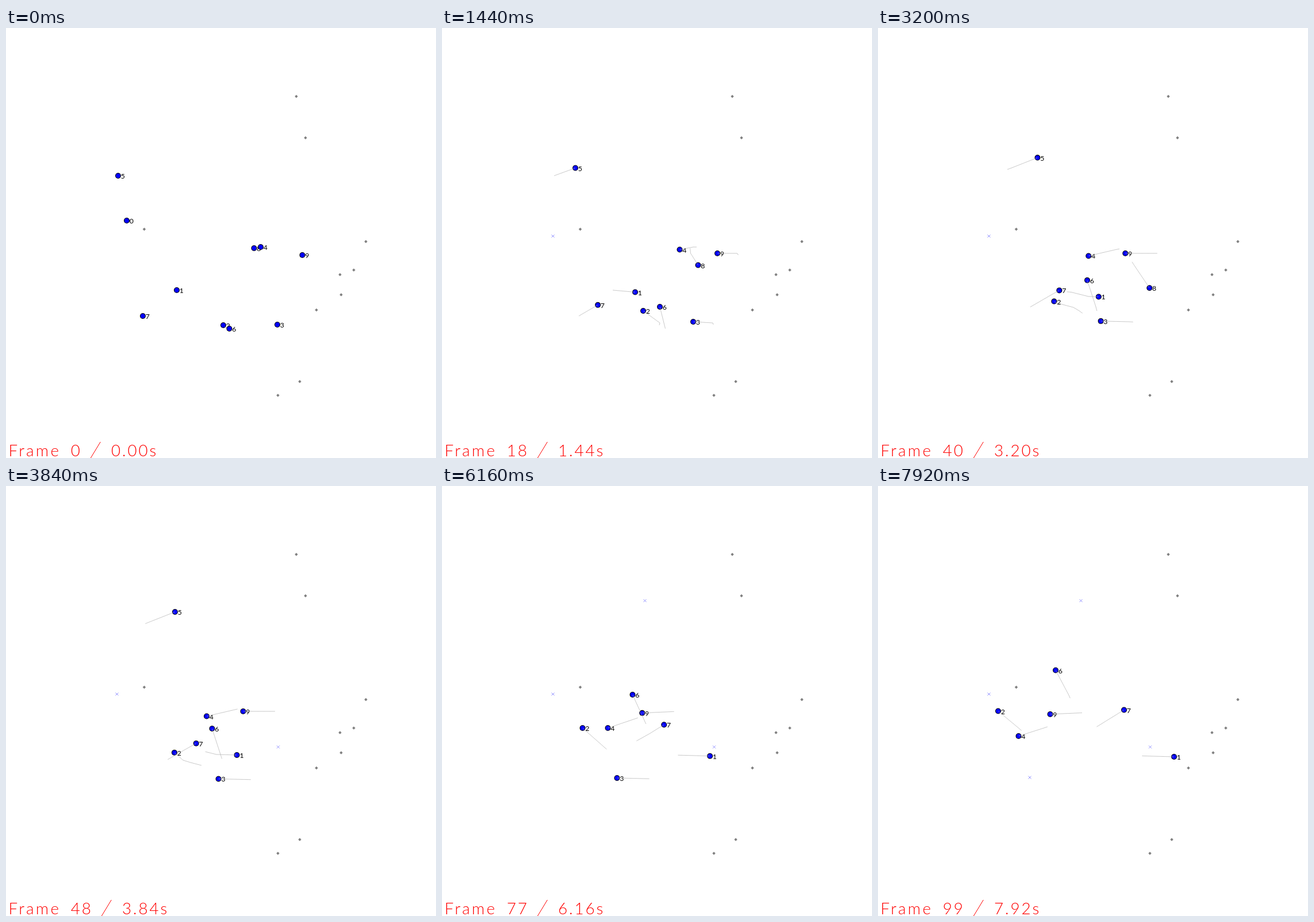
An HTML page with a canvas for the animation above (8 s loop, 748 by 748 pixels).

```html
<!DOCTYPE html>
<html lang="en">
<head>
<meta charset="utf-8">
<title>Moving agents</title>
<style>
  html, body { margin: 0; width: 100%; height: 100%; overflow: hidden; background: #fff; }
  canvas { display: block; }
</style>
</head>
<body>
<canvas id="stage" width="748" height="748"></canvas>
<script>
const ctx = document.getElementById('stage').getContext('2d');
const STEP_MS = 80, STEPS = 100, TRAIL = 25;

const obstacles = [
  [505, 119], [521, 191], [240.5, 350], [626, 371.5], [605, 421],
  [581, 429], [583, 464], [540, 490.5], [511, 615], [473, 639]
];

// Waypoints per agent: [step, x, y]
const agents = [
  [[0, 210, 335], [16, 193, 362]],
  [[0, 297, 456], [18, 336, 459.5], [32, 366, 467], [99, 515, 471]],
  [[0, 378, 517], [2, 379, 513], [18, 350, 492], [23, 340, 486],
   [32, 321, 481], [39, 308, 477], [77, 244.5, 421], [99, 209, 391.5]],
  [[0, 472, 516], [2, 471, 513], [18, 437, 511], [95, 264, 507]],
  [[0, 443, 381], [7, 437, 381], [18, 413.5, 385.5], [48, 349, 400.5],
   [77, 288.5, 421], [99, 244.5, 435]],
  [[0, 195, 257], [18, 232, 243.5], [48, 294, 219], [76, 353, 199.5]],
  [[0, 388.5, 523], [18, 379, 485], [48, 358.5, 422], [77, 331.5, 363], [99, 309, 320.5]],
  [[0, 238, 501], [32, 300, 465], [64, 361.5, 430.5], [99, 428, 389.5]],
  [[0, 431.5, 383], [7, 432.5, 392], [18, 445.5, 412.5], [41, 473.5, 454]],
  [[0, 515.5, 395], [2, 513.5, 392], [18, 479, 392], [48, 412.5, 392], [99, 299.5, 397]]
];

// Agents start from rest and settle to a constant speed
const travelled = n => n - 2 * (1 - Math.exp(-n / 2));

function position(path, n) {
  let i = 1;
  while (i < path.length - 1 && path[i][0] < n) i++;
  const [n0, x0, y0] = path[i - 1], [n1, x1, y1] = path[i];
  const k = (travelled(n) - travelled(n0)) / (travelled(n1) - travelled(n0));
  return [x0 + (x1 - x0) * k, y0 + (y1 - y0) * k];
}

function disc(x, y, r, color) {
  ctx.fillStyle = color;
  ctx.beginPath();
  ctx.arc(x, y, r, 0, Math.PI * 2);
  ctx.fill();
}

function line(points, color) {
  ctx.strokeStyle = color;
  ctx.lineWidth = 1;
  ctx.beginPath();
  points.forEach(([x, y]) => ctx.lineTo(x, y));
  ctx.stroke();
}

function text(str, x, y, font, color, spacing = 0) {
  ctx.font = font + ' Lato, "Open Sans", sans-serif';
  ctx.letterSpacing = spacing + 'px';
  ctx.fillStyle = color;
  ctx.fillText(str, x, y);
}

function drawObstacle([x, y]) {
  ctx.fillStyle = '#808080';
  ctx.beginPath();
  ctx.moveTo(x - 2.7, y);
  ctx.lineTo(x, y - 2.7);
  ctx.lineTo(x + 2.7, y);
  ctx.lineTo(x, y + 2.7);
  ctx.fill();
}

function drawGoal([, x, y]) {
  line([[x - 2.5, y - 2.5], [x + 2.5, y + 2.5]], '#9696ff');
  line([[x - 2.5, y + 2.5], [x + 2.5, y - 2.5]], '#9696ff');
}

function drawCaption(n) {
  const font = '300 27.8px', red = '#f00', base = 744.5;
  const count = String(n), x = 111.3 + 19 * count.length;
  text('Frame', 4.5, base, font, red, 3.3);
  text(count, 112.8, base, font, red, 2.9);
  line([[x + 17, 748], [x + 34, 720]], red);
  text((n * STEP_MS / 1000).toFixed(2) + 's', x + 52.8, base, font, red, 2.9);
}

function draw(n) {
  ctx.fillStyle = '#fff';
  ctx.fillRect(0, 0, 748, 748);
  obstacles.forEach(drawObstacle);

  const active = [];
  agents.forEach((path, id) => {
    const goal = path[path.length - 1];
    if (n >= goal[0] && goal[0] < STEPS - 1) drawGoal(goal);
    else active.push({ id, path, at: position(path, n) });
  });

  for (const { id, at: [x, y] } of active) text(id, x + 4.8, y + 5, '400 12.3px', '#000');
  for (const { at: [x, y] } of active) {
    disc(x, y, 5, '#000');
    disc(x, y, 3.9, '#00f');
  }
  for (const { path } of active) {
    const trail = [];
    for (let i = Math.max(0, n - TRAIL); i <= n; i++) trail.push(position(path, i));
    line(trail, 'rgba(170, 170, 170, 0.65)');
  }
  drawCaption(n);
}

const start = performance.now();
function tick() {
  draw(Math.floor((performance.now() - start) / STEP_MS) % STEPS);
  requestAnimationFrame(tick);
}
tick();
</script>
</body>
</html>
```
